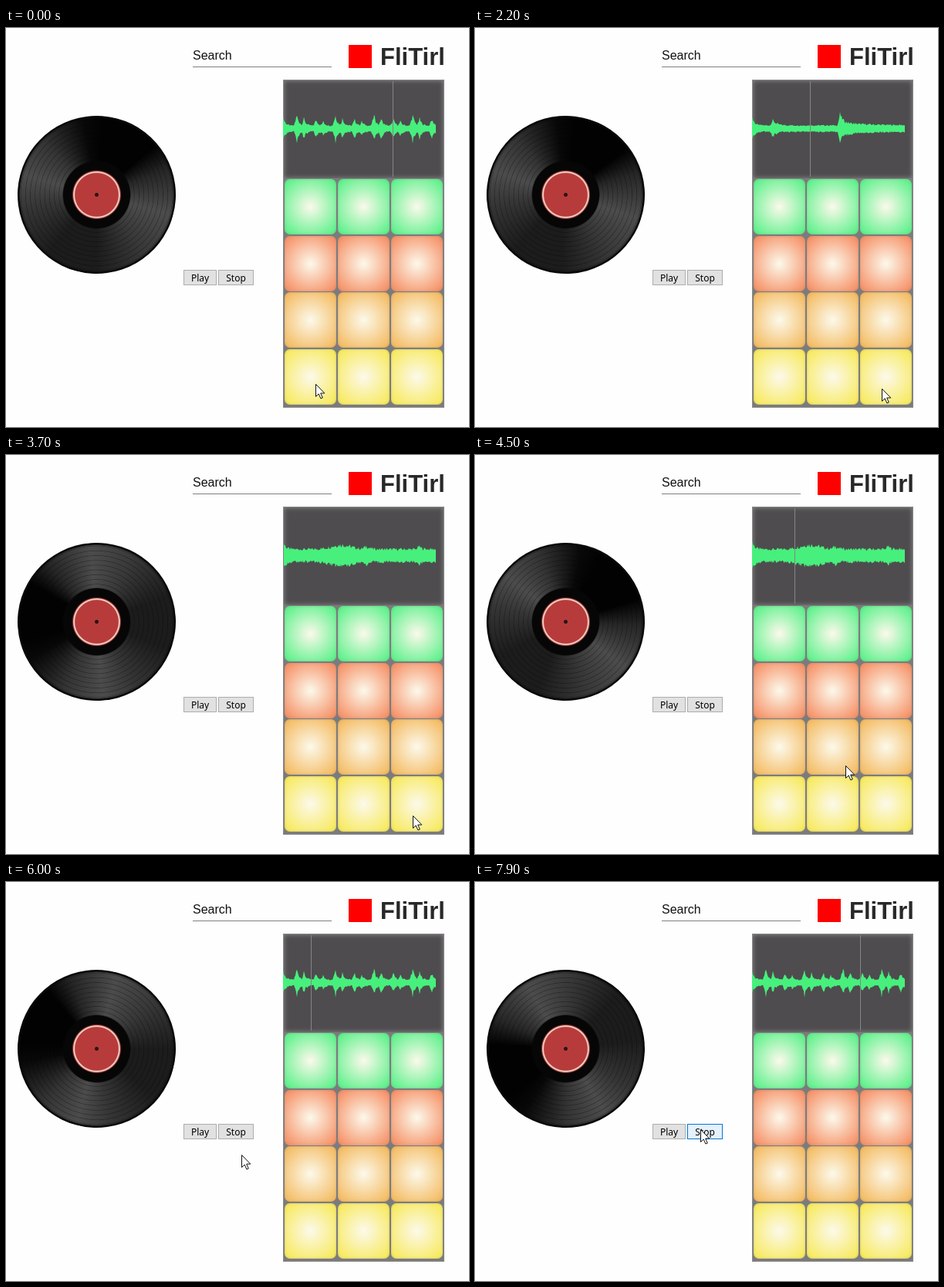
An HTML page for the animation above (8 s loop, 600 px wide and 518 px high).

```html
<!DOCTYPE html>
<html lang="en">
<head>
<meta charset="utf-8">
<title>Turntable and sample pads</title>
<style>
html, body { margin: 0; width: 100%; height: 100%; overflow: hidden; background: #fefefe; }
body *, svg { position: absolute; box-sizing: border-box; }
#search { left: 242px; top: 25px; width: 180px; height: 26px; border-bottom: 1px solid #808080;
  font: 16px/21px "Liberation Sans", Arial, sans-serif; color: #111; }
#mark { left: 444px; top: 22px; width: 30px; height: 30px; background: #f00; }
#brand { left: 485px; top: 20px; font: bold 31px/36px "Liberation Sans", Arial, sans-serif; color: #282828; }
#disc { left: 15px; top: 114px; width: 205px; height: 205px; border-radius: 50%;
  background:
    radial-gradient(circle, #2a1414 2px, #b83b3b 3px 27.8px, #f0d0c4 29px 29.8px, #a03a36 30.8px, #060606 32px 43px, transparent 44.5px 99px, #080808 100.5px),
    repeating-radial-gradient(circle, transparent 0 4.6px, rgba(0,0,0,.32) 5.4px, transparent 6.2px),
    conic-gradient(from 90deg, #4c4c4c, #383838 35deg, #1c1c1c 75deg 115deg, #363636 155deg,
      #4c4c4c 180deg, #343434 210deg, #080808 245deg, #020202 260deg 305deg, #262626 325deg, #4c4c4c); }
.button { top: 314px; height: 20px; background: #e1e1e1; border: 1px solid #adadad; color: #000;
  font: 12px/20px "Noto Sans", sans-serif; text-align: center; }
.button.hover { background: #e5f1fb; border-color: #0078d7; }
#panel { left: 359px; top: 67px; width: 209px; height: 426px; background: #7c7b7c; border: 1px solid #8a898a; }
#screen { left: 360px; top: 68px; width: 207px; height: 127px; background: #4e4c4e; box-shadow: inset 0 0 6px #8c8b8c; }
.pad { width: 67px; height: 72px; border-radius: 7px; box-shadow: inset 0 0 3px #8887; }
svg { left: 0; top: 0; }
</style>
</head>
<body>
<div id="search">Search</div>
<div id="mark"></div>
<div id="brand">FliTirl</div>
<div id="disc"></div>
<div class="button" style="left:230px;width:43px">Play</div>
<div class="button" style="left:275px;width:46px">Stop</div>
<div id="panel"></div>
<div id="screen"></div>
<svg width="600" height="518">
  <path id="wave" fill="#47f07c"/>
  <path id="head" d="M.5 69V193" stroke="#858486"/>
</svg>
<svg width="600" height="518" style="z-index:1">
  <path id="cursor" d="M.5.5V16.5L4.2 13 6.9 19 9.3 18 6.7 12.1H11.8Z" fill="#fff" stroke="#111"/>
</svg>
<script>
const $ = id => document.getElementById(id);
const LOOP = 8000, LEFT = 359, MID = 130.5, WIDTH = 198, GLIDE = 600;

["#4df081", "#f58659", "#f3b554", "#f7e84f"].forEach((color, row) => {
  for (let col = 0; col < 3; col++) {
    const pad = document.createElement("div");
    pad.className = "pad";
    pad.style.cssText = `left:${361 + col * 69}px;top:${196 + Math.round(row * 73.7)}px;` +
      `background:radial-gradient(circle,#fcf9eb,${color})`;
    document.body.append(pad);
  }
});

const noise = n => {
  const v = Math.sin(n * 12.9898) * 43758.5453;
  return v - Math.floor(v);
};

// A peak that rises quickly and dies away.
const hit = (x, at, height, rise, fall) =>
  height * (x < at ? Math.max(0, 1 - (at - x) / rise) : Math.exp((at - x) / fall));

// Strong and weak drum hits take turns, each with an echo.
function beat(x) {
  let level = 4;
  for (let k = 1; k < 9; k++) {
    const at = k * 25 - 7, height = k % 2 ? 14 : 8;
    level = Math.max(level, 4 + hit(x, at, height, 4, 3), 4 + hit(x, at + 9, height * .7, 3, 3));
  }
  return level;
}
const tone = x => 4.5 + hit(x, 27, 7, 4, 5) + hit(x, 114, 12, 3, 4) + hit(x, 114, 4, 4, 35);
const pulse = x => 9 + 6 * Math.exp(-(((x - 75) / 18) ** 2)) + hit(x, 108, 4, 6, 5) + hit(x, 176, 4, 4, 4);

function wavePath(level) {
  const top = [], bottom = [];
  for (let x = 0; x <= WIDTH; x++) {
    const size = level(x) + hit(x, 0, 12, 1, 3);
    top.push(`${LEFT + x} ${MID - size * (.7 + .4 * noise(x + 3))}`);
    bottom.unshift(`${LEFT + x} ${MID + size * (.7 + .4 * noise(x + 503))}`);
  }
  return "M" + top.concat(bottom).join("L") + "Z";
}

// Speed is in pixels per millisecond.
const clips = [
  { start: -2580, speed: .055, shape: wavePath(beat) },
  { start: 1000, speed: .0625, shape: wavePath(tone) },
  { start: 3700, speed: .069, shape: wavePath(pulse) },
  { start: 5350, speed: .055, shape: wavePath(beat) }];

// The cursor rests at each stop and glides to reach the next one at its time.
const stops = [[0, 401, 462], [900, 415, 460], [2100, 527, 468], [4400, 480, 403], [6000, 305, 354], [6700, 292, 321]];

function cursorAt(t) {
  let [, x, y] = stops[0];
  for (const [arrive, toX, toY] of stops) {
    const k = Math.min(1, Math.max(0, 1 + (t - arrive) / GLIDE)), ease = k * k * (3 - 2 * k);
    x += (toX - x) * ease;
    y += (toY - y) * ease;
  }
  return [Math.round(x), Math.round(y)];
}

function draw(t) {
  const clip = clips.filter(c => c.start <= t).pop();
  const [x, y] = cursorAt(t);
  $("disc").style.transform = `rotate(${15 + t * .165}deg)`;
  $("wave").setAttribute("d", clip.shape);
  $("head").setAttribute("transform", `translate(${Math.round(LEFT + (t - clip.start) * clip.speed)})`);
  $("cursor").setAttribute("transform", `translate(${x} ${y})`);
  for (const b of document.querySelectorAll(".button")) {
    const r = b.getBoundingClientRect();
    b.classList.toggle("hover", x >= r.left && x < r.right && y >= r.top && y < r.bottom);
  }
}

const start = performance.now();
function tick() {
  const t = (performance.now() - start) % LOOP;
  draw(Math.floor(t / 100) * 100);
  requestAnimationFrame(tick);
}
tick();
</script>
</body>
</html>
```
